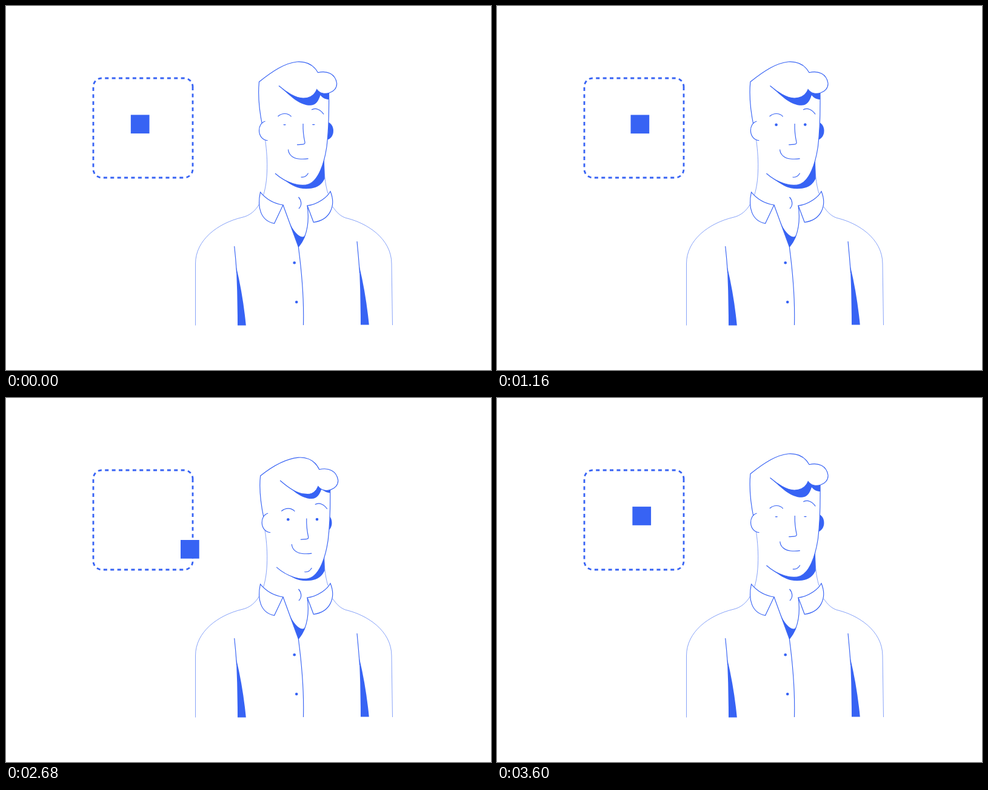
An HTML page that plays this animation: 800x600 px, repeating every 3.64 s.

```html
<!DOCTYPE html>
<html lang="en">
<head>
<meta charset="utf-8">
<title>Head follows the square</title>
<style>
  html, body { margin: 0; width: 100%; height: 100%; overflow: hidden; background: #fff; }
  svg { display: block; width: 800px; height: 600px; --ink: #3763f4; }
  .line { fill: none; stroke: var(--ink); stroke-width: 1.15; }
  .skin { fill: #fff; stroke: var(--ink); stroke-width: 1.15; }
  .thin { fill: none; stroke: var(--ink); stroke-width: .6; }
  .ink { fill: var(--ink); }
  .white { fill: #fff; }
  .dashes { fill: none; stroke: var(--ink); stroke-width: 2.8; stroke-dasharray: 6 5.4; }
</style>
</head>
<body>
<svg viewBox="0 0 800 600">
  <path class="dashes" d="M308 133v136a14 14 0 0 1 -14 14h-136a14 14 0 0 1 -14 -14v-136a14 14 0 0 1 14 -14h136a14 14 0 0 1 14 14"/>
  <rect id="knob" class="ink" width="30.7" height="30.7"/>

  <!-- neck -->
  <path class="ink" d="M456 285C472 296 480 301.3 495 301.3C511 301.3 520 296 525.7 284.5L524.5 245L500 270Z"/>
  <path class="thin" d="M426 212C431 238 434 282 424.5 312M524.6 250C524.4 275 526 292 531 309"/>

  <!-- head -->
  <ellipse id="earR" class="ink" cx="529" cy="205.7" rx="11" ry="14.5"/>
  <g id="head">
    <path class="white" d="M421 130L422 192L436 222L444 276L500 293L529 232L532.5 144Z"/>
    <path class="skin" d="M444 276C462 292 486 299 500 293.5C515 287 524.5 262 529 232C532.3 205 533 180 532.5 144"/>
  </g>
  <path id="shade" class="ink" d="M456 137C470 149 484 163.8 502 163.8C512 163.5 516 155 518.5 147C522 151.5 527 154 532.7 154V138L512 132Z"/>
  <path id="hair" class="skin"/>
  <path id="earL" class="skin" d="M427.5 190C420.5 192 417.3 199 417.5 205.5C417.8 214 423 221.5 431.5 221.8"/>
  <g id="face">
    <path class="line" d="M448.5 182C455 176 465 176 470.5 182.3M504 171C511 167 519 171 524 178.5"/>
    <path class="line" d="M490 194C489.5 208 491 216 493 225C493.3 229 488 228 480 228.7"/>
    <path class="line" d="M465.5 236.5C466 245 473 251 483 252Q491 252.7 498.5 251.6M486.5 282C492 283 496 280 498.5 275.5"/>
    <ellipse class="eye ink" cx="459.5" cy="195.8" rx="2.3"/>
    <ellipse class="eye ink" cx="507.2" cy="195.5" rx="2.3"/>
  </g>

  <!-- shirt -->
  <path class="thin" d="M418 326C412 337 402 346 389 348.5C350 358 312.5 385 312.5 425V526.5M539 331C545 340 553 348 563 350C595 358 636 383 636 425L637.5 526"/>
  <path class="skin" d="M419.5 306.8C428 317 441 325.5 457 328L442.5 358.5C420 354 414 332 419.5 306.8Z"/>
  <path class="skin" d="M535 305.5C530 315 515 327 497 329L507.3 356.5C534 353 545 330 535 305.5Z"/>
  <path class="line" d="M457 328L482.3 397C488 440 491.5 490 490.5 526M497 329C500 350 499 378 482.5 397M482.5 315C487 320 489 328 483 334"/>
  <path class="ink" d="M467.5 356C473 370 482 380 489 380.5Q492 380.5 494.5 376Q491 387 482.5 397Z"/>
  <circle class="ink" cx="475.7" cy="423.2" r="2.3"/>
  <circle class="ink" cx="479.2" cy="488" r="2.3"/>
  <path class="line" d="M376.7 396Q379 417 380.5 440M579 388Q581.5 414 583.5 440"/>
  <path id="fold" class="ink" d="M379.8 430Q391 477 395.8 526.6H382Q382 477 379.8 430Z"/>
  <use href="#fold" x="203" y="-1"/>
</svg>
<script>
const LOOP = 3640, STEP = 40, BLINK = LOOP / 5;

const smooth = u => u * u * (3 - 2 * u);
const rush = u => u ** 3;

// The drag begins and ends at the right edge; times run on past the loop's end
const home = { x: 282, y: 178 };
const drag = [
  { from: 2440, to: 2680, x: 288, y: 234 },
  { from: 2800, to: 3140, x: 288, y: 178 },
  { from: 3120, to: 3650, x: 201, y: 179.5, ease: rush },
  { from: 3920, to: 4180, x: 221.5, y: 179.5 },
  { from: 4120, to: 4360, x: 221.5, y: 116 },
  { from: 4520, to: 4760, x: 220.5, y: 179.5 },
  { from: 4800, to: 5280, ...home },
];

const $ = id => document.getElementById(id);
const eyes = document.querySelectorAll('.eye');
const move = (id, x, y = 0) => $(id).setAttribute('transform', `translate(${x} ${y})`);

function knobAt(t) {
  if (t < drag[0].from) t += LOOP;
  let { x, y } = home;
  for (const { from, to, ease = smooth, ...end } of drag) {
    const k = ease(Math.min(1, Math.max(0, (t - from) / (to - from))));
    x += (end.x - x) * k;
    y += (end.y - y) * k;
  }
  return { x, y };
}

// Hair tips forward most at the quiff, least at the back corner
function hairPath(h) {
  const back = y => y + h * .4, part = y => y + h * .55, top = y => y + h * .75, tip = y => y + h;
  return `M423 198C418 174 415 150 417.5 ${back(125)}`
    + `C440 ${back(107)} 460 ${top(94)} 480 ${top(92)}`
    + `C497 ${top(91)} 508 ${top(98)} 514.5 ${tip(109.7)}`
    + `C530 ${tip(106)} 543 ${tip(112)} 545.5 ${tip(127)}`
    + `C547 ${tip(143)} 522 ${tip(151)} 512.7 ${tip(137.5)}`
    + `C509 ${tip(147)} 501 ${tip(152)} 490 ${top(152)}`
    + `C478 ${top(152)} 462 ${part(142)} 450 ${part(131.5)}`;
}

function draw(t) {
  const { x, y } = knobAt(t);
  const dx = x - 205, dy = y - 179.5;
  const faceY = dy * (dy < 0 ? .05 : .083);
  const headX = dx * .026;

  move('knob', x, y);
  move('face', dx * .07, faceY);
  move('head', headX, faceY * .65);
  move('shade', headX, faceY * .5);
  move('hair', headX);
  move('earL', dx * .056);
  move('earR', dx * -.03);
  $('hair').setAttribute('d', hairPath(dy < 0 ? dy * .025 : Math.max(0, dy - 20) * .235));

  const phase = (t + 24) % BLINK;
  const away = Math.min(phase, BLINK - phase);
  const open = Math.min(1, Math.max(.35, away / 120));
  eyes.forEach(eye => eye.setAttribute('ry', 2.3 * open));
}

let start;
function tick(now) {
  start ??= now;
  draw(Math.floor((now - start) % LOOP / STEP) * STEP);
  requestAnimationFrame(tick);
}
draw(0);
requestAnimationFrame(tick);
</script>
</body>
</html>
```
